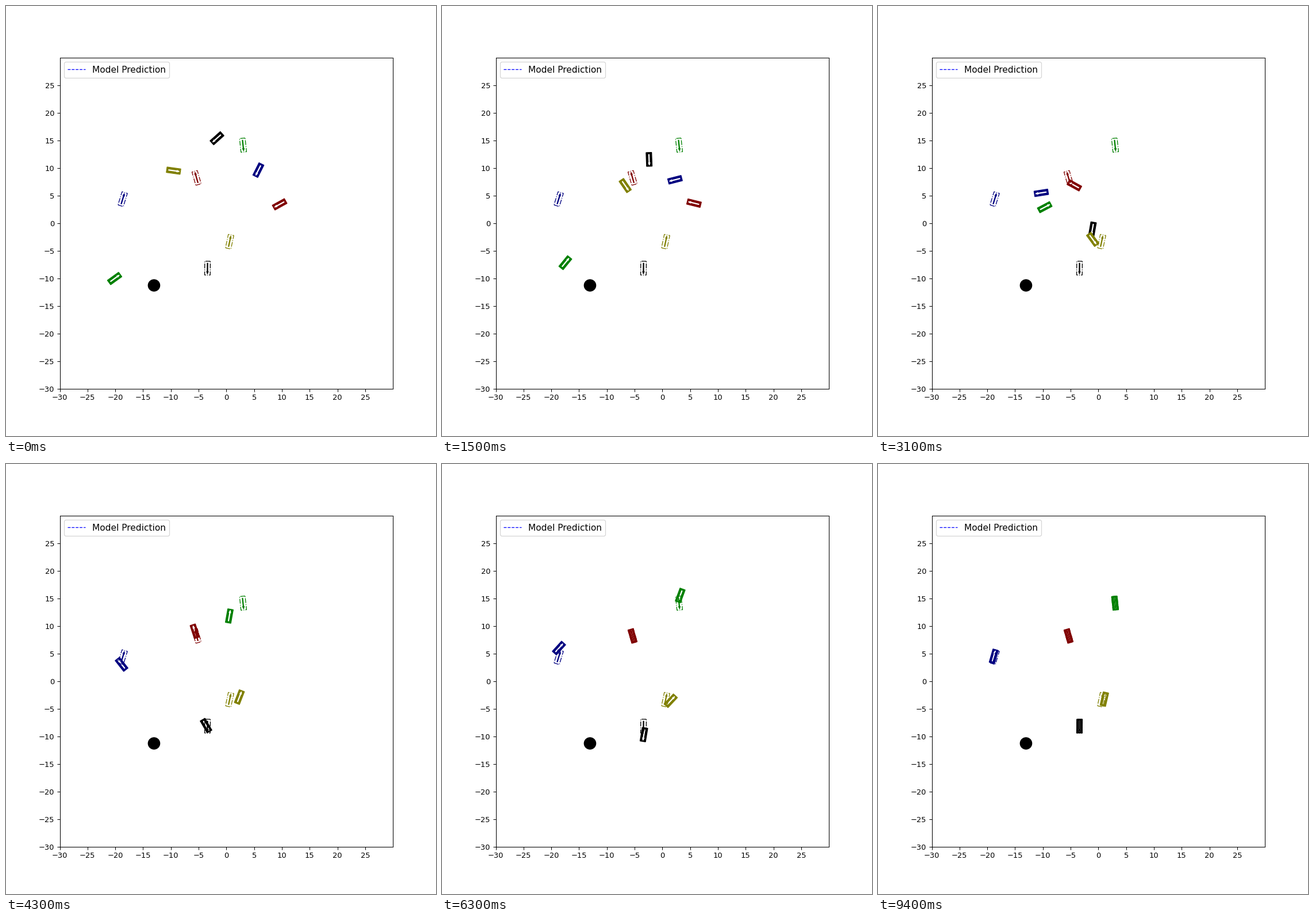
These frames come from a looping animation (748x748 px, 9.9 s). A matplotlib script:

```python
import numpy as np
import matplotlib.pyplot as plt
from matplotlib.animation import FuncAnimation
from matplotlib.patches import Circle, FancyArrow, Rectangle

FRAMES, STEP_MS = 99, 100
LENGTH, WIDTH = 2.5, 1.0
LAUNCH = 3.9  # distance covered while speeding up
STAGES = np.array([1, 15, 31, 43, 52, 80])  # start, launch, cruise, arrive, turn, park

# Colour, goal, parking miss, then the poses (x, y, heading) to pass through.
ROBOTS = [
    ("black", (-3.40, -8.15, 269.5), (0, 0, 0),
     [(-1.69, 15.39, 222), (-1.07, -1.07, 260), (-3.66, -8.05, 300), (-3.30, -9.71, 271)]),
    ("green", (3.00, 14.14, -84), (0, 0, 0),
     [(-20.12, -10.03, 36), (-9.66, 2.89, 28), (0.53, 11.80, 80), (3.69, 15.76, -53)]),
    ("navy", (-18.67, 4.35, 73), (-0.17, 0.15, 1),
     [(5.76, 9.61, 243.5), (-10.28, 5.49, 189), (-18.87, 3.05, 128), (-18.98, 5.70, 66)]),
    ("maroon", (-5.37, 8.20, 106), (0, 0, 0),
     [(9.59, 3.41, 209), (-4.33, 6.85, 151), (-5.68, 9.04, 108)]),
    ("olive", (0.585, -3.36, 78), (0.5, 0.1, -1),
     [(-9.51, 9.51, -8), (-1.02, -2.94, -54), (2.34, -2.89, 69), (1.98, -3.46, 43)]),
]


def unit(deg):
    a = np.radians(deg)
    return np.array([np.cos(a), np.sin(a)])


def launch(start, cruise):
    """Pose after steering from the start heading towards the cruise point."""
    x, y, heading = start
    aim = np.degrees(np.arctan2(cruise[1] - y, cruise[0] - x))
    turn = (aim - heading + 180) % 360 - 180
    dx, dy = LAUNCH * unit(heading + 0.75 * turn)
    return x + dx, y + dy, heading + turn


def drive(poses):
    """Pose per frame: Hermite curves whose velocity follows the heading."""
    pose = np.array(poses, float)
    t = STAGES[:len(pose)]
    gap = np.diff(t)[:, None]
    rate = np.diff(pose, axis=0) / gap
    slope = np.zeros_like(pose)  # at rest at both ends
    slope[1:-1] = (rate[:-1] * gap[1:] + rate[1:] * gap[:-1]) / (gap[:-1] + gap[1:])
    ahead = unit(pose[:, 2]).T
    speed = (slope[:, :2] * ahead).sum(axis=1, keepdims=True)
    slope[:, :2] = speed * ahead

    now = np.clip(np.arange(FRAMES), t[0], t[-1])
    i = np.clip(np.searchsorted(t, now, side="right") - 1, 0, len(t) - 2)
    h = gap[i]
    u = (now - t[i])[:, None] / h
    rise = u * u * (3 - 2 * u)
    return (pose[i] * (1 - rise) + pose[i + 1] * rise
            + h * u * (1 - u) * (slope[i] * (1 - u) - slope[i + 1] * u))


def corner(x, y):
    return x - WIDTH / 2, y - LENGTH / 2


def arrow_span(x, y, deg):
    c, s = unit(deg)
    return dict(x=x - 0.9 * c, y=y - 0.9 * s, dx=1.5 * c, dy=1.5 * s)


def add_box(pose, **style):
    x, y, deg = pose
    return ax.add_patch(Rectangle(corner(x, y), WIDTH, LENGTH, angle=deg - 90,
                                  rotation_point="center", lw=1, **style))


def add_arrow(pose, color):
    return ax.add_patch(FancyArrow(**arrow_span(*pose), width=0.1, color=color, lw=1))


fig = plt.figure(figsize=(8, 8), dpi=93.5)
ax = fig.add_subplot()
ticks = np.arange(-30, 30, 5)
ax.set(xlim=(-30, 30), ylim=(-30, 30), xticks=ticks, yticks=ticks)
ax.plot([], [], "b--", lw=1, label="Model Prediction")
ax.legend(loc="upper left", fontsize=11.8)
ax.add_patch(Circle((-13.03, -11.28), 1.05, color="black"))

cars = []
for color, goal, miss, poses in ROBOTS:
    start, cruise, *rest = poses
    park = np.add(goal, miss)
    path = drive([start, launch(start, cruise), cruise, *rest, park])
    cars.append((path, add_box(start, color=color), add_arrow(start, "white")))
for color, goal, *_ in ROBOTS:
    add_box(goal, fill=False, ec=color, ls="dashdot")
    add_arrow(goal, color)


def update(frame):
    for path, box, arrow in cars:
        x, y, deg = path[frame]
        box.set_xy(corner(x, y))
        box.set_angle(deg - 90)
        arrow.set_data(**arrow_span(x, y, deg))
    return [artist for car in cars for artist in car[1:]]


anim = FuncAnimation(fig, update, frames=FRAMES, interval=STEP_MS,
                     repeat=True, repeat_delay=0, blit=False)
plt.show()
```
